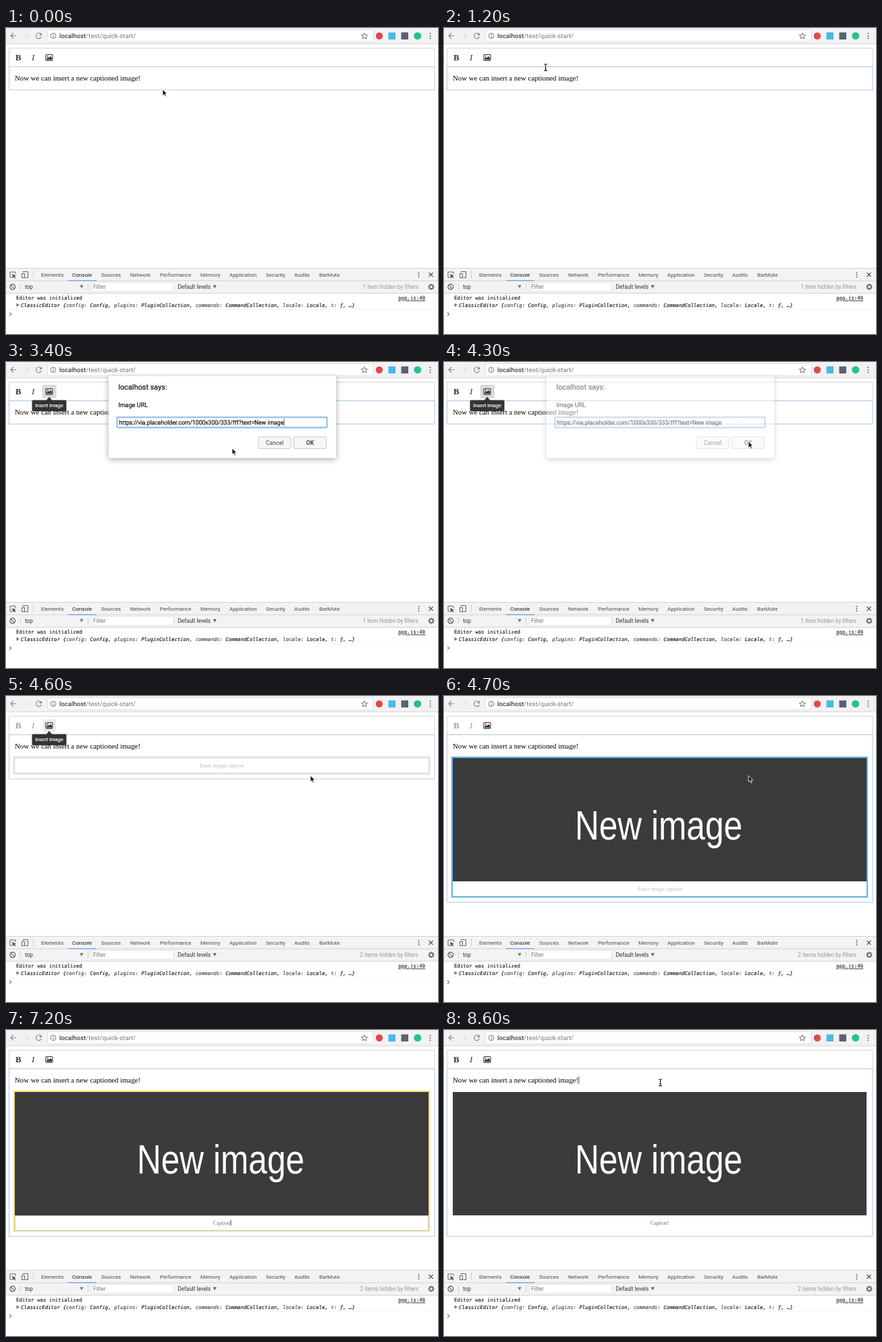
Animation, 640 px wide and 454 px high, one loop 8.7 s. Source, as an HTML page:

```html
<!DOCTYPE html>
<html lang="en">
<head>
<meta charset="utf-8">
<title>Inserting a captioned image</title>
<style>
html, body { margin: 0; width: 100%; height: 100%; overflow: hidden; background: #fff; }
svg { position: absolute; left: 0; top: 0; width: 640px; height: 454px; }
text { font-family: Roboto, sans-serif; white-space: pre; }
.serif { font-family: "Liberation Serif", serif; }
.sans { font-family: "Liberation Sans", sans-serif; }
.mono { font-family: "DejaVu Sans Mono", monospace; stroke: #222; stroke-width: .15; }
.strong { stroke: currentColor; stroke-width: .2; }
#dialog { transform-origin: 320px 142px; color: #111; }
#box { filter: drop-shadow(0 2px 4px rgba(0, 0, 0, .35)); }
</style>
</head>
<body>
<svg id="page" viewBox="0 0 640 454"><g id="chrome"></g><g id="editor"></g></svg>
<svg id="dialog" viewBox="0 0 640 454"></svg>
<svg id="pointer" viewBox="0 0 640 454"></svg>
<script>
const LOOP = 8700, STEP = 100;
const $ = id => document.getElementById(id);

const text = (x, y, str, size, fill = '#333', more = '') =>
  `<text x="${x}" y="${y}" font-size="${size}" fill="${fill}" ${more}>${str}</text>`;
const rect = (x, y, w, h, fill, stroke = 'none', more = '') =>
  `<rect x="${x}" y="${y}" width="${w}" height="${h}" fill="${fill}" stroke="${stroke}" ${more}/>`;
const line = (d, stroke, width = 1) =>
  `<path d="${d}" fill="none" stroke="${stroke}" stroke-width="${width}"/>`;
const circle = (x, y, r, fill, stroke = 'none', width = 1) =>
  `<circle cx="${x}" cy="${y}" r="${r}" fill="${fill}" stroke="${stroke}" stroke-width="${width}"/>`;
const shape = (d, fill, more = '') => `<path d="${d}" fill="${fill}" ${more}/>`;
const dots = (x, y, gap) => [-1, 0, 1].map(i => circle(x, y + i * gap, 1, '#666')).join('');
const caret = (x, y, h = 11) => rect(x, y, 0.8, h, '#222');

function addressBar() {
  return rect(0, 0, 640, 24, '#f2f2f2') + line('M0 23.5H640', '#d8d8d8') +
    rect(61.5, 2.5, 483, 18, '#fff', '#e0e0e0', 'rx="2.5"') +
    line('M15 11.5H7M11 7.5L7 11.5L11 15.5', '#8a8a8a', 1.2) +
    line('M25 11.5H33M29.5 7.5L33.5 11.5L29.5 15.5', '#e2e2e2', 1.2) +
    line('M51.7 9A4 4 0 1 0 52.3 13', '#8a8a8a', 1.2) + shape('M53 7V11H49Z', '#8a8a8a') +
    circle(70, 11.7, 3.9, 'none', '#666', 0.9) + line('M70 11V14M70 9.2V10.2', '#666') +
    text(79, 15.2, 'localhost<tspan fill="#777">/test/quick-start/</tspan>', 9.65, '#111') +
    '<path d="M531 7.3l1.3 3 3.2.3-2.4 2.1.7 3.2-2.8-1.7-2.8 1.7.7-3.2-2.4-2.1 3.2-.3z" fill="none" stroke="#666" stroke-width=".9"/>' +
    circle(553, 11.7, 5.2, '#e0484c') + rect(566.5, 6.5, 10.5, 10.5, '#4cb7ea') +
    rect(585.5, 6.5, 10.5, 10.5, '#596273') + circle(609.7, 11.7, 5.5, '#27c28b') +
    dots(628.5, 11.7, 3.6);
}

function devTools() {
  const tabs = { Elements: 52, Console: 98, Sources: 141, Network: 184, Performance: 228,
    Memory: 288, Application: 331, Security: 385, Audits: 427, BarMute: 464 };
  const pairs = { config: 'Config', plugins: 'PluginCollection',
    commands: 'CommandCollection', locale: 'Locale', t: 'ƒ' };
  const preview = Object.entries(pairs)
    .map(([k, v]) => `<tspan fill="#555">${k}:</tspan> ${v}, `).join('');
  const gear = Array.from({ length: 8 }, (_, i) =>
    `<path d="M630 379.4V381" stroke="#666" stroke-width="1.7" transform="rotate(${i * 45} 630 384)"/>`).join('');
  return rect(0, 356, 640, 37, '#f3f3f3') +
    line('M0 356.5H640M0 375H640M0 393.5H640', '#d2d2d2') +
    line('M10 370H6V362H14V365', '#666') + shape('M9 365L15 367.5L12.6 368.4L14.5 370.4L13.4 371.4L11.5 369.4L10.6 371.4Z', '#555') +
    line('M25 363V361.5H32.5V370.5H28.5', '#666') + rect(23.5, 364.5, 4, 6, '#f3f3f3', '#666') +
    line('M40.5 360V371M21.5 379V389M121.5 379V389', '#d0d0d0') +
    Object.entries(tabs).map(([name, x]) =>
      text(x, 368.8, name, 8.05, name == 'Console' ? '#111' : '#4a4a4a')).join('') +
    rect(92, 374.2, 42, 1.2, '#6f9ce8') + dots(611.5, 366, 3.3) +
    line('M626.5 363L632.5 369M632.5 363L626.5 369', '#555', 1.2) +
    circle(9.8, 384, 3.9, 'none', '#555', 1.1) + line('M7 381.2L12.6 386.8', '#555', 1.1) +
    text(28, 387, 'top', 8.2) + shape('M109.3 381.5H114.7L112 386.3Z', '#777') +
    rect(126.5, 377.5, 122, 13, '#fff', '#e4e4e4') + text(129, 387, 'Filter', 8.5, '#777') +
    text(254.5, 387, 'Default levels', 8.15, '#333') + shape('M306.5 381.5H312L309.2 386.3Z', '#666') +
    gear + circle(630, 384, 2.7, 'none', '#666', 1.5) +
    text(15, 403.4, 'Editor was initialized', 7.4, '#222', 'class="mono"') +
    text(581, 403.4, 'app.js:49', 7.4, '#333', 'class="mono" text-decoration="underline"') +
    shape('M15.5 408.3V413.7L20 411Z', '#777') +
    text(22, 413.6, `ClassicEditor {${preview}…}`, 7.42, '#111', 'class="mono" font-style="italic"') +
    line('M0 417.5H640', '#f6f6f6') + line('M5 421.8L7.8 424.5L5 427.2', '#777', 1.1);
}

function typed(t) {
  return t >= 7400 ? 'Caption!' : 'Caption'.slice(0, Math.max(0, Math.floor((t - 6300) / 100)));
}

function figure(t, mouse) {
  const loaded = t >= 4700, editing = t >= 5700 && t < 8400;
  const bottom = loaded ? 298 : 115;
  const hover = mouse.y > 91;
  const edge = !loaded ? '#e2e2e2' : t < 5700 ? '#6fb5e6' : hover ? '#fbdf7c' : 'none';
  let out = rect(12, 91, 615, bottom - 91, '#fff', edge, `stroke-width="${loaded ? 2.4 : 3}"`);
  if (loaded) {
    // The picture's lettering is a narrow grotesque.
    out += rect(13, 92, 613, 183, '#3b3b3b') +
      text(0, 0, 'New image', 60.5, '#fff', 'class="sans" text-anchor="middle" transform="translate(318 213) scale(.82 1)"');
  }
  if (editing) out += rect(13.5, 275.5, 612, 22, '#fff', '#b5cbdb');
  const label = t < 5700 ? 'Enter image caption' : typed(t);
  return out + text(319.6, loaded ? 288.9 : 105.9, label, 8.1, t < 5700 ? '#bdbdbd' : '#777',
    'id="caption" class="serif" text-anchor="middle"');
}

function editor(t, mouse) {
  const focused = t >= 700 && t < 4600 || t >= 4700;
  const bottom = t < 4600 ? 92 : t < 4700 ? 123 : 306;
  const ink = t >= 4600 && t < 5700 ? '#a0a0a0' : '#333';
  const hovered = t >= 1500 && t < 4700, pressed = t >= 1800 && t < 4600;
  let out = rect(4.5, 30, 630.5, 27.5, '#fff', '#d4d4d4') +
    rect(4.5, 57.5, 630.5, bottom - 57.5, '#fff', focused ? '#a9c8e3' : '#cbcbcb');
  if (hovered) out += rect(54.5, 34.5, 19.5, 18.5, pressed ? '#dcdcdc' : '#ebebeb', pressed ? '#cfcfcf' : 'none', 'rx="1"');
  out += text(14, 47.8, 'B', 12.8, ink, 'class="serif" font-weight="bold"') +
    text(38, 47.8, 'I', 13, ink, 'class="serif" font-style="italic"') +
    rect(59, 39.5, 10, 8.6, 'none', '#333', 'rx="1" stroke-width="1.1"') +
    shape('M60.3 46.8V45L62.3 43L63.6 44.3L66 41.8L68 44.2V46.8Z', '#333') + circle(61.8, 41.8, 0.9, '#333') +
    text(13, 78.4, 'Now we can insert a new captioned image!', 10.8, '#000', 'class="serif"');
  const blink = t >= 8400 || t >= 700 && t < 4600 && (t - 700) % 1000 < 500;
  if (blink) out += caret(199.4, 69);
  if (t >= 4600) out += figure(t, mouse);
  if (hovered) {
    out += shape('M64 51.8L68.5 57H59.5Z', '#333') + rect(38.5, 56.5, 51, 16.5, '#333', 'none', 'rx="1.5"') +
      text(43.2, 67.4, 'Insert image', 7.6, '#fff', 'class="sans strong" color="#fff"');
  }
  return out;
}

function dialog(t) {
  const url = 'https://via.placeholder.com/1000x300/333/fff?text=New image';
  const button = (x, label, more = '') => rect(x, 111, 48, 17.5, '#f6f6f6', '#cacaca', 'rx="1.5"') +
    text(x + 24, 123, label, 8.6, '#444', `text-anchor="middle" ${more}`);
  const ring = t > 2000;
  return `<g id="box">${rect(152, 20.5, 337, 122, '#fff')}</g>` +
    text(166.5, 41, 'localhost says:', 10.9, '#111', 'class="strong"') +
    text(166.5, 66.6, 'Image URL', 9, '#111', 'class="strong"') +
    rect(164.5, 82, 311, 15.2, '#fff', ring ? '#9cc5ec' : '#ddd', `stroke-width="${ring ? 2.4 : 1}" rx="1"`) +
    (t >= 3000 ? text(167.6, 92.9, url, 8.65, '#111', 'id="url" class="strong"') : '') +
    button(374, 'Cancel') + button(426.5, 'OK', 'font-weight="bold"');
}

// time, x, y
const track = [[100, 232, 91], [300, 234, 76], [800, 234, 76], [1600, 67, 41], [2100, 67, 41],
  [2450, 270, 150], [2600, 335, 128], [3400, 335, 128], [3700, 451, 118],
  [4900, 451, 118], [5600, 330, 286], [7500, 330, 286], [8300, 320.5, 78]];

function mouseAt(t) {
  const i = track.findIndex(k => k[0] > t);
  if (i <= 0) {
    const [, x, y] = i ? track[track.length - 1] : track[0];
    return { x, y };
  }
  const [a, b] = [track[i - 1], track[i]];
  const p = (t - a[0]) / (b[0] - a[0]), e = p * p * (3 - 2 * p);
  return { x: a[1] + (b[1] - a[1]) * e, y: a[2] + (b[2] - a[2]) * e };
}

function pointer(t, { x, y }) {
  if (t >= 6400 && t < 7600) return '';
  const beam = t < 1700 ? y > 57 && y < 91 : t > 4700 && (y > 275 || y < 91);
  const art = beam
    ? line('M-2.5 -5Q0 -5 0 -3Q0 -5 2.5 -5M0 -3V3M-2.5 5Q0 5 0 3Q0 5 2.5 5M-1.3 1.5H1.3', '#222', 1.1)
    : shape('M0 0V9.4L2.2 7.4L3.8 11L5.4 10.3L3.8 6.8H6.7Z', '#111', 'stroke="#fff" stroke-width=".8"');
  return `<g transform="translate(${x} ${y})">${art}</g>`;
}

function draw(t) {
  const mouse = mouseAt(t);
  $('editor').innerHTML = editor(t, mouse) +
    text(611, 387, t < 4600 ? '1 item hidden by filters' : '2 items hidden by filters', 8.2, '#999', 'text-anchor="end"');
  if (t >= 5700 && t < 8400 && (t < 7500 || t % 1000 < 500)) {
    const half = typed(t) ? $('caption').getComputedTextLength() / 2 : 0;
    $('editor').insertAdjacentHTML('beforeend', caret(319.8 + half, 281.5, 9));
  }

  const open = Math.min(1, Math.max(0, (t - 1800) / 300));
  const alpha = t < 2100 ? open * 1.1 : t < 4300 ? 1 : Math.max(0, 1 - (t - 4200) / 200);
  const tilt = 1 - open, box = $('dialog');
  box.style.opacity = alpha;
  box.style.transform = tilt
    ? `translateY(${-15 * tilt}px) perspective(300px) rotateX(${11.7 * tilt}deg) scaleY(${1 + 0.09 * tilt})` : 'none';
  box.innerHTML = alpha ? dialog(t) : '';
  if (alpha && t < 3900) {
    const end = t >= 3000 ? $('url').getComputedTextLength() : 0;
    box.insertAdjacentHTML('beforeend', caret(168 + end, 84));
  }
  $('pointer').innerHTML = pointer(t, mouse);
}

$('chrome').innerHTML = addressBar() + devTools();
const start = performance.now();
let last = -1;
function tick() {
  const t = Math.floor((performance.now() - start) % LOOP / STEP) * STEP;
  if (t != last) draw(last = t);
  requestAnimationFrame(tick);
}
tick();
</script>
</body>
</html>
```
